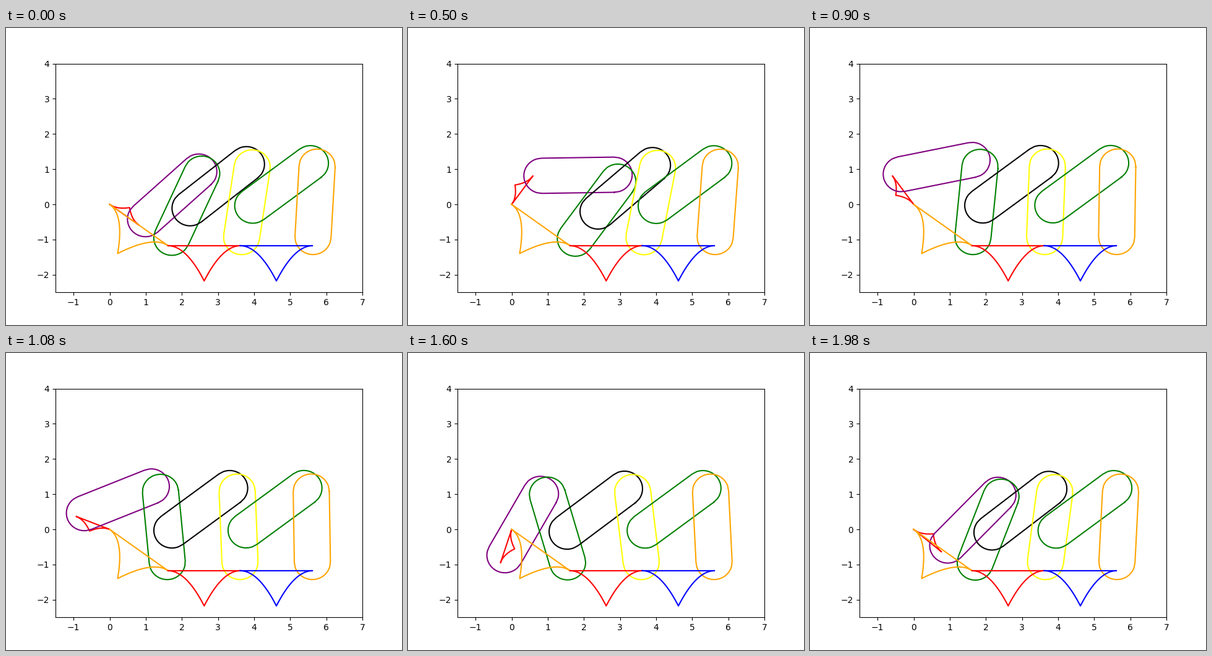
Write a matplotlib script that moves like this. It is 640 px wide and 480 px high and loops after 2000 ms.

```python
import numpy as np
import matplotlib.pyplot as plt
from matplotlib.animation import FuncAnimation

FRAMES = 100
BAR = 2.5      # long links
GROUND = 2.0   # spacing of fixed pivots
TAP = 1.0      # where the next bar attaches on a rocker


def horn(length, side):
    """Straight edge plus two parabolic arcs meeting in a cusp."""
    x = np.linspace(0, length, 101)
    y = side * np.minimum(x, length - x) ** 2
    return np.append(x, 0), np.append(y, 0)


def capsule(length, r=0.5, inset=0.25):
    """Round-ended bar whose joints sit halfway into the end caps."""
    y = np.linspace(-r, r, 50)
    cap = np.sqrt(r * r - y * y)
    x = np.concatenate([length - inset + cap, inset - cap])
    y = np.concatenate([y, -y])
    return np.append(x, x[0]), np.append(y, y[0])


def place(shape, start, direction):
    """Turn a shape along a unit complex direction and move it to start."""
    x, y = shape
    z = start + (x + 1j * y) * direction
    return z.real, z.imag


def apex(a, b):
    """Upper meeting point of two bars of equal length from a and b."""
    d = b - a
    half = abs(d) / 2
    return (a + b) / 2 + 1j * d / abs(d) * np.sqrt(BAR ** 2 - half ** 2)


TILT = np.exp(-1j * np.pi / 5)
PIVOTS = [GROUND * TILT + GROUND * k for k in range(3)]
CRANK = horn(1.0, 1)
BASE = horn(GROUND, -1)
LINK = capsule(BAR)

fig, ax = plt.subplots(figsize=(6.4, 4.8), dpi=100)
ax.set_xlim(-1.5, 7)
ax.set_ylim(-2.5, 4)

crank, = ax.plot([], [], color="red")
links = [ax.plot([], [], color=c)[0]
         for c in ("purple", "green", "black", "yellow", "green", "orange")]
ax.plot(*place(BASE, 0, TILT), color="orange")
ax.plot(*place(BASE, PIVOTS[0], 1), color="red")
ax.plot(*place(BASE, PIVOTS[1], 1), color="blue")


def update(i):
    tip = TILT * np.exp(2j * np.pi * i / FRAMES)
    crank.set_data(*place(CRANK, 0, tip))
    start = tip
    for k, pivot in enumerate(PIVOTS):
        joint = apex(start, pivot)
        rocker = (joint - pivot) / BAR
        links[2 * k].set_data(*place(LINK, start, (joint - start) / BAR))
        links[2 * k + 1].set_data(*place(LINK, pivot, rocker))
        start = pivot + TAP * rocker
    return [crank, *links]


anim = FuncAnimation(fig, update, frames=FRAMES, interval=20, repeat=True)
plt.show()
```
